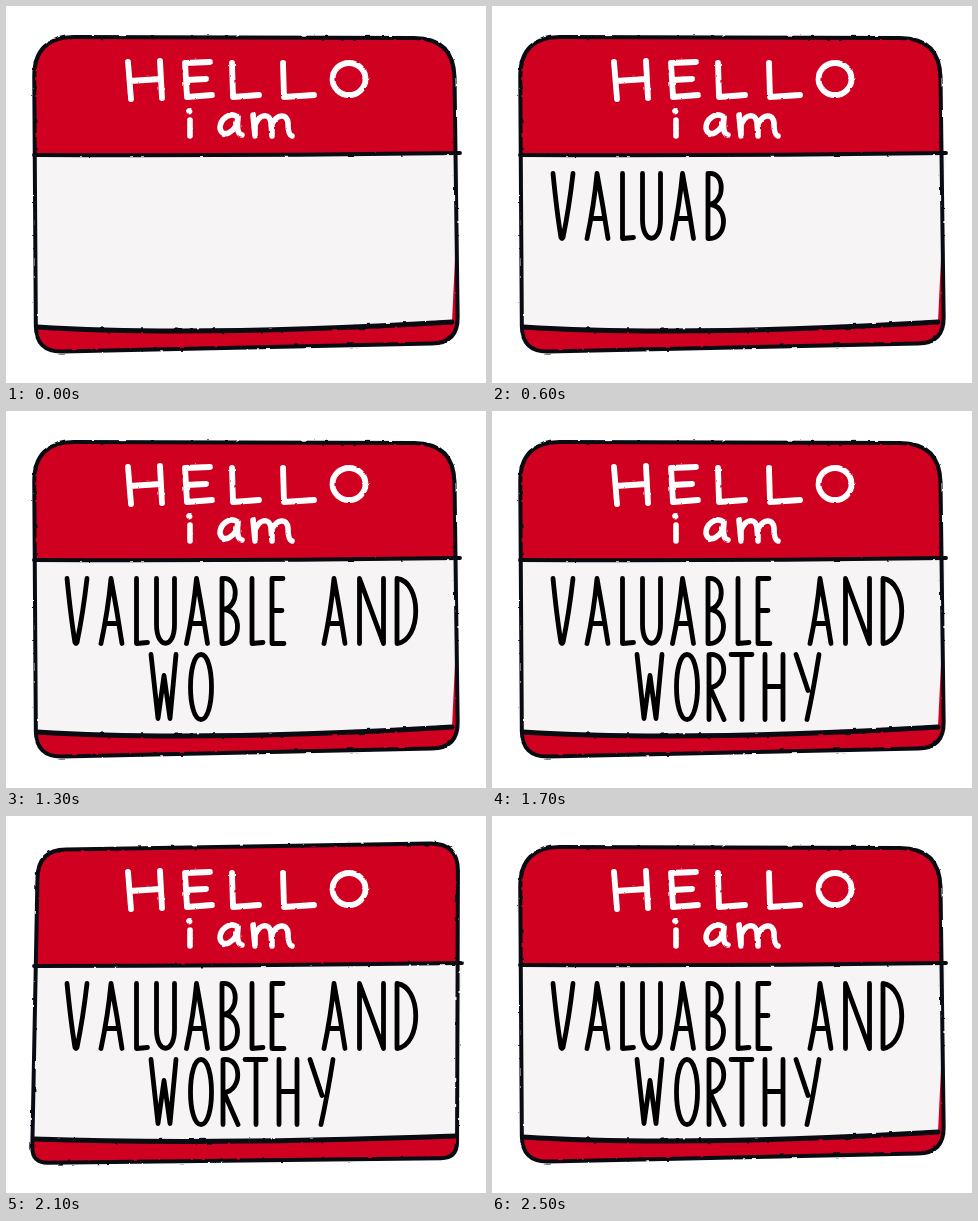
Animation of 480x377 px, one loop 3000 ms. Source, as an HTML page:

```html
<!DOCTYPE html>
<html lang="en">
<head>
<meta charset="utf-8">
<title>Hello, I am</title>
<style>
  html, body { margin: 0; width: 100%; height: 100%; overflow: hidden; background: #fff; }
  svg { display: block; width: 100vw; height: 100vh; }
  path { stroke-linecap: round; stroke-linejoin: round; }
  .ink { fill: none; stroke: #090b12; }
  .chalk { fill: none; stroke: #fff; }
  #words { fill: none; stroke: #000; stroke-width: 4.8; }
</style>
</head>
<body>
<svg viewBox="0 0 480 377" role="img" aria-label="Hello, I am valuable and worthy">
  <defs id="defs"></defs>
  <g id="badges"></g>
  <g class="chalk" filter="url(#rough0)">
    <path stroke-width="5.8" d="M122 56l3 37M154 55l2 37M124 75l30 -2
      M204 56l-25 1l2 34l25 -2M180 74l20 -1M226 57l1 34l26 -2M277 57l1 34l30 -2"/>
    <ellipse stroke-width="5.8" cx="343" cy="73" rx="16.5" ry="16"/>
    <path stroke-width="5.6" d="M184 114v16M183 105l.5 .5
      M232 111C223 105 214 114 214 122C216 133 230 127 232 112C231 121 231 128 236 129
      M247 109l2 21v-11C254 107 264 107 265 117l1 13v-12C271 108 281 107 282 117Q282 129 286 130"/>
  </g>
  <g id="words"></g>
</svg>
<script>
const LOOP = 3000, STEP = 100;
const NS = 'http://www.w3.org/2000/svg';
const $ = id => document.getElementById(id);

function add(parent, tag, attrs) {
  const el = document.createElementNS(NS, tag);
  for (const key in attrs) el.setAttribute(key, attrs[key]);
  return parent.appendChild(el);
}

// box: four corners clockwise; r: top and bottom radius; top, base: start, control, end.
const round = {
  box: [28, 31, 448, 32, 452, 337, 30, 346], r: [40, 26],
  top: [28, 149, 240, 150, 454, 147], base: [31, 321, 190, 331, 446, 316]
};
const square = {
  box: [32, 34, 452, 27, 451, 342, 26, 347], r: [28, 16],
  top: [28, 150, 240, 150, 456, 147], base: [28, 323, 200, 329, 450, 320]
};
const between = {};
for (const key in round) between[key] = round[key].map((v, i) => v + (square[key][i] - v) * 0.6);

function roundedBox(box, r) {
  const corner = i => box.slice(i % 4 * 2, i % 4 * 2 + 2);
  const toward = (a, b, dist) => {
    const k = dist / Math.hypot(b[0] - a[0], b[1] - a[1]);
    return a.map((v, j) => v + (b[j] - v) * k);
  };
  let d = '';
  for (let i = 0; i < 4; i++) {
    const c = corner(i), size = r[i >> 1];
    d += `${i ? 'L' : 'M'}${toward(c, corner(i + 3), size)}Q${c} ${toward(c, corner(i + 1), size)}`;
  }
  return d + 'Z';
}

const bend = ([x, y, cx, cy, ex, ey]) => `${x} ${y}Q${cx} ${cy} ${ex} ${ey}`;
const flip = ([x, y, cx, cy, ex, ey]) => [ex, ey, cx, cy, x, y];

function badge({ box, r, top, base }, seed) {
  const filter = add($('defs'), 'filter', {
    id: 'rough' + seed, filterUnits: 'userSpaceOnUse', x: 0, y: 0, width: 480, height: 377,
    'color-interpolation-filters': 'sRGB'
  });
  add(filter, 'feTurbulence', { type: 'fractalNoise', baseFrequency: 0.15, numOctaves: 1, seed: seed + 3 });
  add(filter, 'feDisplacementMap', {
    in: 'SourceGraphic', scale: 2.5, xChannelSelector: 'R', yChannelSelector: 'G'
  });

  const g = add($('badges'), 'g', { filter: `url(#rough${seed})` });
  const edge = roundedBox(box, r);
  const ink = (d, width) => add(g, 'path', { d, class: 'ink', 'stroke-width': width });
  add(g, 'path', { d: edge, fill: '#cf0020' });
  add(g, 'path', { d: `M${bend(top)}L${bend(flip(base))}Z`, fill: '#f6f4f5' });
  ink(edge, 4);
  ink('M' + bend(top), 3.8);
  ink('M' + bend(base), 5);
  return g;
}

// Each glyph: [advance, strokes in a 65 px tall box].
const glyphs = {
  V: [34, 'M0 0Q4 40 8 64Q9 66 10 64Q16 35 20 0'],
  A: [35.5, 'M0 65Q7 32 10 0Q16 32 21 65M4 45h12'],
  L: [20, 'M0 0v65l11 -1'],
  U: [30, 'M0 0v46c0 25 18 25 18 0v-46'],
  B: [30, 'M0 0v65M0 0c17 -3 18 29 1 31c20 0 19 36 -1 34'],
  E: [22, 'M11 0h-11v65h12M0 32h10'],
  N: [37.5, 'M0 65v-65l24 65v-65'],
  D: [32, 'M0 0v65c25 -3 25 -62 0 -65'],
  W: [39, 'M0 0l7 64l6 -43l6 43l6 -64'],
  O: [33, 'M11 0c-14 0 -14 65 0 65c14 0 14 -65 0 -65'],
  R: [22, 'M0 65v-65c19 -3 20 31 1 33l14 32'],
  T: [34, 'M0 0h21M11 0v65'],
  H: [31, 'M0 0v65M18 0v65M0 32h18'],
  Y: [30, 'M0 0l12 36M23 0q-6 38 -12 65'],
  ' ': [30, '']
};

const letters = [];
function write(text, x, y) {
  for (const char of text) {
    const [advance, d] = glyphs[char];
    if (d) letters.push(add($('words'), 'path', { d, transform: `translate(${x} ${y})` }));
    x += advance;
  }
}
write('VALUABLE AND', 61, 167.5);
write('WORTHY', 145, 243.5);

const poses = [badge(round, 0), badge(between, 1), badge(square, 2)];

// Poses change every 200 ms from 1900 on: between, square, between, then rest.
const poseAt = t => [1, 2, 1][Math.floor((t - 1900) / 200)] || 0;

const show = (el, on) => { el.style.visibility = on ? 'visible' : 'hidden'; };

function draw(t) {
  letters.forEach((el, i) => show(el, t >= (i + 1) * STEP));
  poses.forEach((el, i) => show(el, i === poseAt(t)));
}

const start = performance.now();
function tick() {
  draw(Math.round(performance.now() - start) % LOOP);
  requestAnimationFrame(tick);
}
tick();
</script>
</body>
</html>
```
